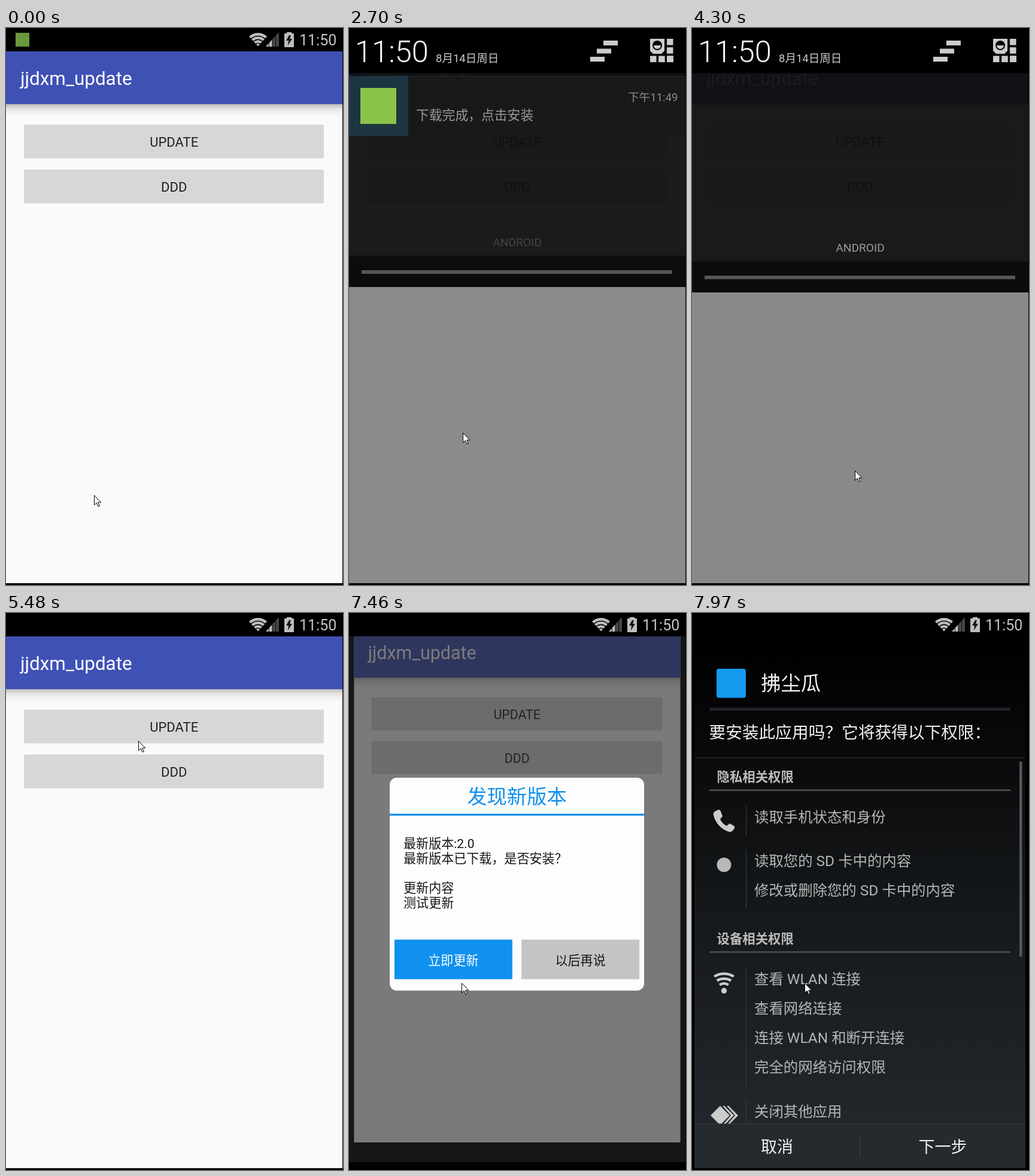
These frames come from a looping animation (563x929 px, 8000 ms). An HTML page with a canvas:

```html
<!DOCTYPE html>
<html lang="zh-CN">
<head>
<meta charset="utf-8">
<title>Update flow</title>
<style>
html, body { margin: 0; width: 100%; height: 100%; overflow: hidden; background: #000; }
canvas { display: block; }
</style>
</head>
<body>
<canvas id="stage" width="563" height="929"></canvas>
<script>
const W = 562, BOTTOM = 926, LOOP = 8000;
const STEP = 132.3, DELAY = 30;
const PANEL = 441;
const g = document.getElementById('stage').getContext('2d');
// The TC face centres full-width punctuation.
const FONT = "Roboto, 'Noto Sans CJK TC', 'Noto Sans CJK SC', 'Noto Sans CJK', sans-serif";
const BLUE = '#1091ee', ICON = '#bebebe', PALE = '#ccc', BRIGHT = '#f2f2f2';

// Turning points of the pointer: step, x, y; straight travel in between.
const ROUTE = [
  [2, 147, 779], [5, 280, 576], [7, 154, 510], [9, 171, 381],
  [13, 125, 119], [15, 156, 26], [17, 157, 18], [20, 190, 675],
  [22, 472, 290], [26, 432, 38], [28, 432, 38], [32, 272, 738],
  [37, 220, 227], [38, 221, 213], [44, 221, 213], [48, 192, 578], [51, 188, 617]
];

const progress = (n, from, to) => Math.min(1, Math.max(0, (n - from) / (to - from)));
const mix = (a, b, p) => a + (b - a) * p;

function pointerAt(n) {
  const next = ROUTE.findIndex(r => r[0] >= n);
  const b = ROUTE.at(next), a = next > 0 ? ROUTE[next - 1] : b;
  const p = a === b ? 0 : progress(n, a[0], b[0]);
  return [mix(a[1], b[1], p), mix(a[2], b[2], p)];
}

function shadeHeight(n) {
  const opened = 1 - (1 - progress(n, 17, 21)) ** 2.8;
  return PANEL * (opened - progress(n, 32, 34));
}

function box(x1, y1, x2, y2, color, radius = 0) {
  g.fillStyle = color;
  g.beginPath();
  g.roundRect(x1, y1, x2 - x1, y2 - y1, radius);
  g.fill();
}

function text(str, x, y, size, color, align = 'left', weight = 400) {
  g.font = `${weight} ${size}px ${FONT}`;
  g.textAlign = align;
  g.fillStyle = color;
  g.fillText(str, x, y);
}

function path(d, color) {
  g.fillStyle = color;
  g.fill(new Path2D(d));
}

function disc(x, y, r, color, to = 2 * Math.PI) {
  g.fillStyle = color;
  g.beginPath();
  g.arc(x, y, r, 0, to);
  g.fill();
}

function waves(x, y, first, gap, count, width, spread, color) {
  g.strokeStyle = color;
  g.lineWidth = width;
  for (let i = 0; i < count; i++) {
    g.beginPath();
    g.arc(x, y, first + i * gap, -Math.PI / 2 - spread, -Math.PI / 2 + spread);
    g.stroke();
  }
}

function vertical(y1, y2, stops) {
  const fill = g.createLinearGradient(0, y1, 0, y2);
  stops.forEach((c, i) => fill.addColorStop(i / (stops.length - 1), c));
  return fill;
}

// Draws inside a clip rectangle.
function clipped(x, y, w, h, draw) {
  g.save();
  g.beginPath();
  g.rect(x, y, w, h);
  g.clip();
  draw();
  g.restore();
}

function statusBar(notified) {
  box(0, 0, 563, 39, '#000');
  if (notified) box(16, 8, 39, 31, '#6a983f');
  waves(421, 30.5, 2.2, 5.95, 4, 4.4, .74, ICON);
  for (let i = 0; i < 4; i++) {
    const x = i * 5.7;
    path(`M${434 + x} 31v${-x * 1.09}l4.8-5.2V31z`, i < 2 ? ICON : '#484848');
  }
  box(469, 7, 477, 10, ICON);
  box(465, 9, 481, 32, ICON, 1);
  path('M473 12l-5 9h4l-1 8 7-11h-4l2-6z', '#111');
  text('11:50', 490, 29, 25, '#c4c4c4');
}

function home(pressed) {
  box(0, 39, W, BOTTOM, '#fafafa');
  box(0, 127, W, 148, vertical(127, 148, ['rgba(0,0,0,.25)', 'rgba(0,0,0,.1)', 'rgba(0,0,0,.035)', 'rgba(0,0,0,0)']));
  box(0, 39, W, 127, '#3f51b5');
  text('jjdxm_update', 24, 95, 31.4, '#fff');
  ['UPDATE', 'DDD'].forEach((label, i) => {
    const y = 161 + i * 75;
    box(30, y, 531, y + 56.5, pressed && i === 0 ? '#c8c9c9' : '#d6d7d7', 3);
    text(label, 280.7, y + 37, 22, '#212121', 'center');
  });
}

function dialog(pressed) {
  box(-20, 0, 600, 960, 'rgba(37,37,37,.6)');
  box(61.4, 299, 499.6, 665, '#fdfdfd', 12);
  text('发现新版本', 280.5, 343.5, 34.3, BLUE, 'center');
  box(61.4, 361, 499.6, 364.3, BLUE);
  ['最新版本:2.0', '最新版本已下载，是否安装？', '', '更新内容', '测试更新'].forEach((line, i) =>
    text(line, 85.2, 419.5 + i * 25.7, 21.7, '#151515'));
  ['立即更新', '以后再说'].forEach((label, i) => {
    const x = 69.6 + i * 218.8;
    box(x, 577.5, x + 203, 645.5, i ? '#c4c4c4' : pressed ? '#0c76c4' : BLUE);
    text(label, x + 101.5, 620.5, 21.7, i ? '#151515' : '#fff', 'center');
  });
}

function notice(dx) {
  if (dx >= W) return;
  g.save();
  g.globalAlpha = 1 - dx / 650;
  g.translate(dx, 0);
  box(0, 80, W, 180, '#191919');
  box(0, 80, W, 81, '#242424');
  box(0, 80, 99, 180, '#1c3540');
  box(19, 100, 79, 160, '#8bc34a');
  text('下载完成，点击安装', 112, 153, 21.8, '#999');
  text('下午11:49', 549.5, 122, 18.6, '#8a8a8a', 'right');
  g.restore();
}

function shadeHeader() {
  box(0, 0, 563, 75, '#000');
  text('11:50', 10, 57, 50.6, '#fff', 'left', 300);
  text('8月14日周日', 145, 56.5, 18.5, PALE);
  for (let i = 0; i < 3; i++) box(425 - i * 11, 21 + i * 13.5, 449 - i * 11, 29 + i * 13.5, PALE);
  box(503, 18, 527, 43, PALE);
  disc(515, 29, 8, '#000');
  disc(515, 29, 6, PALE, Math.PI);
  path('M503 43v-5l5 5zM527 43v-5l-5 5z', '#000');
  for (let i = 0; i < 3; i++) {
    const s = i * 14.2;
    box(531, 18 + s, 541.5, 28.5 + s, PALE);
    box(503 + s, 46.5, 513.5 + s, 57, PALE);
  }
}

function shade(height, dx) {
  box(0, 0, W, BOTTOM, `rgba(0,0,0,${.456 * height / PANEL})`);
  clipped(0, 0, W, height, () => {
    box(0, 0, W, height, 'rgba(15,15,15,.9)');
    notice(dx);
    g.globalAlpha = progress(height, PANEL - 13.5, PANEL);
    text('ANDROID', 281, height - 68, 19.2, '#999', 'center');
    g.globalAlpha = 1;
    box(0, height - 53, W, height, '#0c0c0c');
    box(0, height - 53, W, height - 51, '#131315');
    box(21, height - 28, 540, height - 22, '#565656');
    shadeHeader();
  });
}

function section(title, y) {
  text(title, 41.5, y, 21.4, '#bcbcbc', 'left', 700);
  box(29, y + 13, 532, y + 16, '#46494b');
}

function permissions(lines, y) {
  lines.forEach((line, i) => text(line, 104, y + i * 49, 24.4, '#b4b6b7'));
  box(90, y - 27, 91, y + 22 + (lines.length - 1) * 49, '#3b3e41');
}

function installer() {
  box(4, 55, 557, BOTTOM, vertical(55, BOTTOM, ['#000', '#0b0c0e', '#15181a', '#1d2125', '#252a2f']));
  box(41, 93, 90, 141.5, '#139aef', 4);
  text('拂尘瓜', 115, 129, 33.4, BRIGHT);
  box(29, 158, 532, 163, '#222329');
  text('要安装此应用吗？它将获得以下权限：', 28.5, 209, 27.7, BRIGHT);
  box(4, 241, 557, 242, '#303336');
  box(547, 248, 551.5, 573, '#55585a');
  section('隐私相关权限', 281);
  section('设备相关权限', 551);
  path('M38 331l6-3q3 0 4 3l3 8-4 5q4 8 11 11l5-4 7 4q2 2 1 4l-4 5q-3 2-8 0Q42 357 36 338q-1-5 2-7z', PALE);
  disc(53.5, 420, 12, '#b8b8b8');
  disc(53.5, 630, 4.7, PALE);
  waves(53.5, 632, 14, 8.2, 3, 4.3, .56, PALE);
  permissions(['读取手机状态和身份'], 349);
  permissions(['读取您的 SD 卡中的内容', '修改或删除您的 SD 卡中的内容'], 422);
  permissions(['查看 WLAN 连接', '查看网络连接', '连接 WLAN 和断开连接', '完全的网络访问权限'], 619);
  clipped(4, 800, 553, 52, () => {
    permissions(['关闭其他应用'], 840);
    path('M31 838l16-16 16 16-16 16z', PALE);
    for (const x of [51, 58]) path(`M${x} 822h3l16 16-16 16h-3l14-16z`, PALE);
  });
  box(4, 852, 557, BOTTOM, '#252a2e');
  box(4, 851.5, 557, 852.5, '#3b4044');
  box(280, 871, 281, 908, '#42474b');
  text('取消', 142, 900, 27, BRIGHT, 'center');
  text('下一步', 419, 900, 27, BRIGHT, 'center');
}

function pointer([x, y]) {
  const shape = new Path2D('M.5 .5V16.5L4.3 13 7 19 9.3 18 6.7 12.2H11.7Z');
  g.save();
  g.translate(Math.round(x), Math.round(y));
  g.fillStyle = '#fff';
  g.fill(shape);
  g.strokeStyle = '#000';
  g.lineWidth = 1;
  g.stroke(shape);
  g.restore();
}

// Scales a screen about the stage centre and shifts it vertically.
function moved(scale, dy, draw) {
  g.save();
  g.translate(280.5, 482 + dy);
  g.scale(scale, scale);
  g.translate(-280.5, -482);
  draw();
  g.restore();
}

function screens(n) {
  const leave = progress(n, 54, 57), wait = 1 - progress(n, 57, 60);
  if (n < 58) {
    moved(1 - .0675 * leave ** 2, -226 * leave ** 5, () => {
      home(n === 40);
      if (n >= 42) dialog(n === 53 || n === 54);
    });
  } else {
    moved(1 - .06 * wait, 1170 * wait ** 2, installer);
  }
}

function render(t) {
  const n = Math.max(0, Math.floor((t - DELAY) / STEP));
  box(0, 0, 563, 929, '#000');
  clipped(0, 39, W, BOTTOM - 39, () => screens(n));
  statusBar(n < 30);
  const height = shadeHeight(n);
  if (height > 0) shade(height, 200 * Math.max(0, n - 27));
  if (n !== 11 && n !== 12) pointer(pointerAt(n));
}

const start = performance.now();
function tick() {
  render((performance.now() - start) % LOOP);
  requestAnimationFrame(tick);
}
tick();
</script>
</body>
</html>
```
